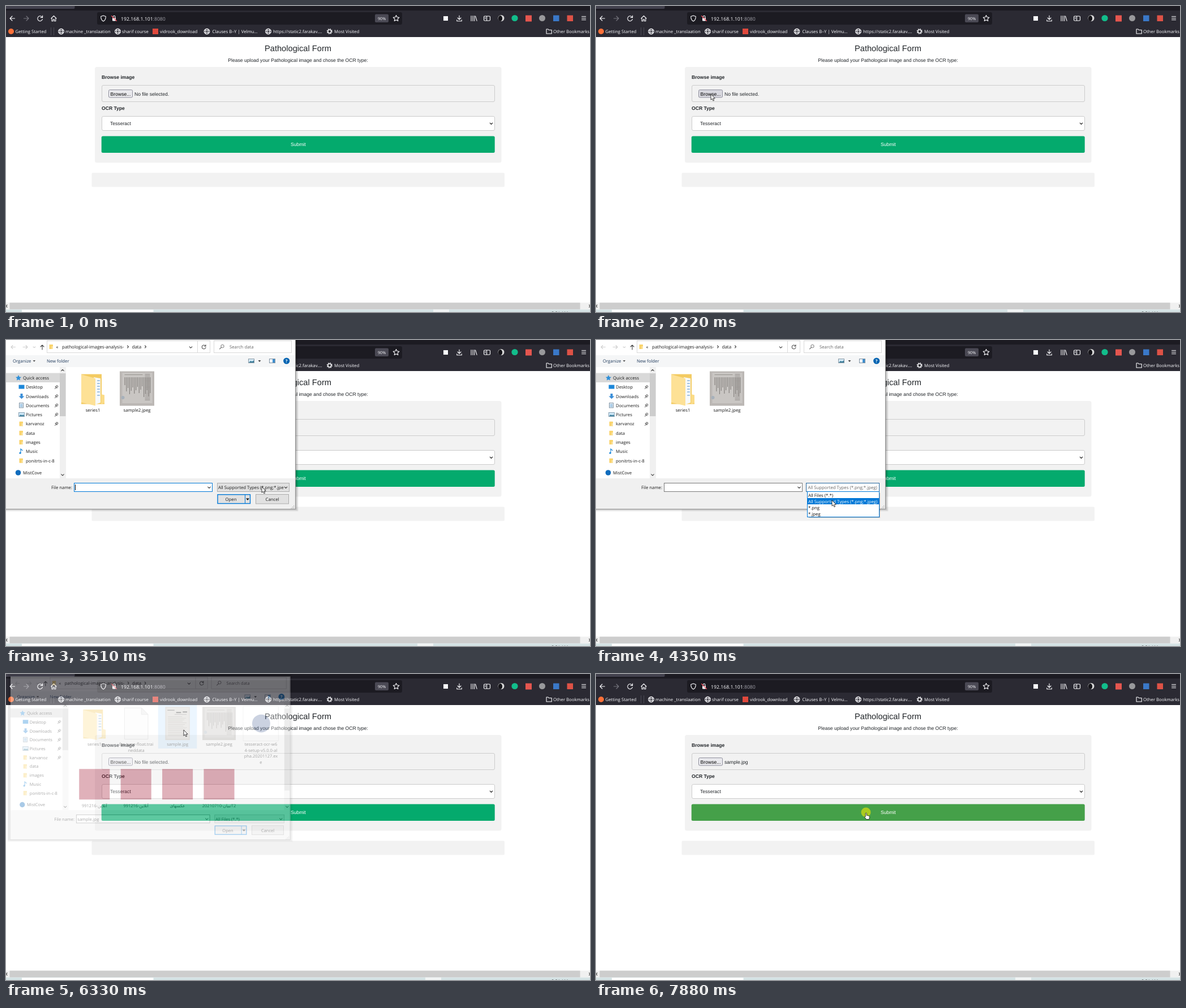
An HTML page that plays this animation: 1032x542 px, repeating every 8 s.

```html
<!DOCTYPE html>
<html lang="en">
<head>
<meta charset="utf-8">
<title>Pathological Form</title>
<style>
  html, body { margin: 0; width: 100%; height: 100%; overflow: hidden; background: #fff; }
  svg { display: block; }
  text { text-rendering: geometricPrecision; white-space: pre; }
  .page { font: 8.6px "Liberation Sans", Arial, sans-serif; fill: #212529; }
  .ui { font: 7.75px "Open Sans", "Noto Sans", "DejaVu Sans", sans-serif; }
  .mid { text-anchor: middle; }
  .line { fill: none; stroke-width: 1.1; stroke-linejoin: round; stroke-linecap: round; }
</style>
</head>
<body>
<svg id="stage" width="1032" height="542" viewBox="0 0 1032 542"></svg>
<script>
const LOOP = 8000;
const stage = document.getElementById('stage');

const rect = (x, y, w, h, fill, more = '') =>
  `<rect x="${x}" y="${y}" width="${w}" height="${h}" fill="${fill}" ${more}/>`;
const box = (x, y, w, h, fill, stroke, more = '') =>
  rect(x + .5, y + .5, w - 1, h - 1, fill, `stroke="${stroke}" ${more}`);
const disc = (x, y, r, fill, more = '') => `<circle cx="${x}" cy="${y}" r="${r}" fill="${fill}" ${more}/>`;
const shape = (d, fill, more = '') => `<path d="${d}" fill="${fill}" ${more}/>`;
const line = (d, stroke = '#fbfbfe', more = '') => `<path class="line" d="${d}" stroke="${stroke}" ${more}/>`;
const text = (x, y, s, more = '') => `<text x="${x}" y="${y}" ${more}>${s}</text>`;
const mid = (x, y, s, more = '') => text(x, y, s, `class="mid" ${more}`);
const group = (id, body, more = '') => `<g id="${id}" ${more}>${body}</g>`;
const chevron = (x, y, up, color = '#444') =>
  line(`M${x - 2.3} ${y + (up ? 1.2 : -1.2)}l2.3 ${up ? -2.4 : 2.4}l2.3 ${up ? 2.4 : -2.4}`, color);
const times = (n, f) => Array.from({ length: n }, (_, i) => f(i)).join('');

function globe(x) {
  return `<g class="line" stroke="#fbfbfe"><circle cx="${x}" cy="45" r="4.8"/>
    <ellipse cx="${x}" cy="45" rx="2.2" ry="4.8"/><path d="M${x - 4.6} 43.3h9.2M${x - 4.6} 46.7h9.2"/></g>`;
}

function star(x, y, r) {
  const points = times(10, i => {
    const a = i * Math.PI / 5 - Math.PI / 2, q = i % 2 ? r * .48 : r;
    return `${x + q * Math.cos(a)},${y + q * Math.sin(a)} `;
  });
  return `<polygon class="line" stroke="#fbfbfe" points="${points}"/>`;
}

function toolbar() {
  return rect(0, 0, 1032, 8, '#1c1b22') + rect(-5, -5, 126.5, 10, '#42414d', 'rx="2"') +
    rect(0, 8, 1032, 47, '#2b2a33') + rect(161, 11, 539, 22, '#1c1b22', 'rx="3"') +
    line('M15.5 22H7m4-4l-4 4 4 4') + line('M31.5 22H40m-4-4l4 4-4 4', '#77767f') +
    line('M64 20a4.4 4.4 0 1 0 .4 3.4M64.6 17v3.4h-3.5') +
    line('M79.8 22l4.6-4.6 4.6 4.6M81 21.3v5.5h2.3v-3h2.2v3h2.3v-5.5') +
    line('M172 17l4.3 1.5c0 4-1 7-4.3 8.5c-3.3-1.5-4.3-4.5-4.3-8.5z') +
    rect(188, 21, 6, 5.5, '#fbfbfe', 'rx="1"') + line('M189.3 21v-2a1.8 1.8 0 0 1 3.6 0v2') +
    line('M186.5 17.5l9 9', '#ff4f5e') +
    text(203, 25.5, '192.168.1.101<tspan fill="#a09fa8">:8080</tspan>', 'style="font-size:8.7px"') +
    rect(652, 14.5, 24, 14.5, '#4a4954', 'rx="2"') + mid(664, 24.7, '90%', 'style="font-size:7.2px"') +
    star(689.5, 22, 5.6) + rect(773, 18, 8, 8, '#fbfbfe') +
    line('M801 17v7m-3-3l3 3 3-3M796.8 24.5v2.3h8.4v-2.3') +
    line('M822 17.5v9M825 17.5v9M827.8 17.5v9M829.5 18l2.6 8.3') +
    line('M846 18h8q1.5 0 1.5 1.5v5q0 1.5-1.5 1.5h-8q-1.5 0-1.5-1.5v-5q0-1.5 1.5-1.5zM849.5 18v8M846.5 20.5h1M846.5 22.5h1') +
    disc(875, 21.5, 5.5, '#d8d8d8') + '<ellipse cx="873.5" cy="22" rx="3.6" ry="5" fill="#151419"/>' +
    disc(899, 21.5, 5.6, '#12bd8b') + rect(918, 16.5, 11, 11, '#e5564f') +
    disc(947.5, 21.5, 5.5, '#99999c') + rect(967, 16.5, 10.5, 10.5, '#3a78c8') +
    rect(991.5, 16.5, 10.5, 10.5, '#dd5246') + line('M1017.5 18.5h7M1017.5 21.5h7M1017.5 24.5h7') +
    disc(9, 45, 5, '#ff7139') + text(16.5, 48, 'Getting Started') +
    rect(79, 38, 1, 14, '#4b4a54') + rect(84, 38, 1, 14, '#4b4a54') +
    globe(97.5) + text(105, 48, 'machine _translaation') + globe(197.5) + text(205, 48, 'sharif course') +
    rect(259, 40, 10, 10, '#e0483c') + text(272, 48, 'vidrook_download') +
    globe(355) + text(364.5, 48, 'Clauses B–Y | Velmu...') + globe(463.5) + text(472, 48, 'https://static2.farakav....') +
    disc(571.8, 45, 2.9, 'none', 'stroke="#fbfbfe" stroke-width="1.4"') +
    disc(571.8, 45, 4.3, 'none', 'stroke="#fbfbfe" stroke-width="1.4" stroke-dasharray="1.7 1.677"') +
    text(580, 48, 'Most Visited') +
    line('M955 41h3l1.2 1.5h5v6.5h-9.2z') + text(967, 48, 'Other Bookmarks');
}

function form() {
  return mid(516, 80, 'Pathological Form', 'style="font-size:14.65px"') +
    mid(516, 98.7, 'Please upload your Pathological image and chose the OCR type:') +
    rect(157, 108, 718.5, 169.5, '#f2f2f2', 'rx="3.5"') + rect(151.5, 295.5, 729.5, 25, '#f2f2f2', 'rx="2"') +
    text(169, 129, 'Browse image', 'font-weight="bold"') + text(169, 184, 'OCR Type', 'font-weight="bold"') +
    box(169, 140, 695, 30, 'none', '#ccc', 'rx="2.5"') +
    box(181, 148, 43, 14.5, '#e9e9ed', '#8f8f9d', 'rx="2" id="browse"') + mid(202.5, 158.8, 'Browse...', 'fill="#000"') +
    text(227, 158.8, '', 'id="chosen"') +
    box(169, 195, 695, 26, '#fff', '#ccc', 'rx="2.5"') + text(184, 211, 'Tesseract') + chevron(857.5, 208.3, false, '#222') +
    rect(168.7, 230.5, 695, 29.5, '#04aa6d', 'rx="2.5" id="submit"') + mid(516.3, 248.4, 'Submit', 'fill="#fff"');
}

function bottomBar() {
  return rect(0, 525.5, 1032, 12, '#f0f0f0') + rect(6.5, 525.5, 1008, 12, '#cdcdcd', 'id="thumb"') +
    line('M2 529.5l-2 2 2 2M1030.5 529.5l2 2-2 2', '#444') + rect(0, 537.5, 1032, 5, '#d5e3e5') +
    rect(28, 538, 232.5, 4, '#fff') + rect(755, 537.5, 28, 5, '#f1f4f4', 'id="task"') +
    text(964, 547.2, '3:31 AM', 'fill="#222"');
}

const folder = (x, y) => rect(x, y - 4, 6.5, 8, '#f9d36c', 'rx=".6"') + rect(x + 4, y - 1, 2.5, 5, '#fbe3a0');

function sidebar() {
  const names = ['Desktop', 'Downloads', 'Documents', 'Pictures', 'karvanoz', 'data', 'images', 'Music', 'ponitrts-in-c-8'];
  const rowY = i => 83.3 + i * 16.3;
  return rect(0, 58.5, 95, 16.5, '#d9d9d9') + rect(95, 48, 11, 197, '#f0f0f0') + rect(95, 59, 10.5, 76, '#cdcdcd') +
    chevron(100, 53.5, true) + chevron(100, 239, false) +
    shape('M22 62l1.5 3.3 3.5.4-2.6 2.4.7 3.5-3.1-1.7-3.1 1.7.7-3.5-2.6-2.4 3.5-.4z', '#2f8fd8') +
    text(30, 70, 'Quick access') +
    names.map((name, i) => text(35, rowY(i) + 2.9, name) +
      (i < 5 ? line(`M86.5 ${rowY(i) + 3}l2-2.5m-1.5-1.5l3 3m-2-3l2-2 2 2-2 2z`, '#777') : '')).join('') +
    rect(22.5, 79.5, 10, 7, '#1c87d9') +
    shape('M25.5 95h4v4.5h3l-5 4.8-5-4.8h3z', '#3a8ed8') +
    box(23, 111, 8, 9.5, '#fff', '#7d93a5') + line('M25 114h4M25 116h4M25 118h4', '#5b9bd0') +
    box(22, 128, 11, 8, '#cfe8f7', '#8aa2b3') + shape('M23 135l3-3 2.5 1.5 2-1.5 2 3z', '#3d7f9c') +
    [4, 5, 6, 8].map(i => folder(23.5, rowY(i))).join('') +
    line('M26 200v-7.5q1 2.5 3.5 3', '#1c87d9') + disc(25, 200.2, 1.6, '#1c87d9') +
    disc(21.5, 235, 4.8, '#0f6cbd') + text(30, 238, 'MistCove');
}

function bigFolder() {
  return shape('M133 60.5h36v36l5 2v15h-41z', '#f3cb62') + shape('M155 66l12 2v43l-12 4z', '#f7f9fb') +
    line('M161.5 72h4M161.5 77h4M161.5 82h4M161.5 87h4M161.5 92h4M161.5 98h4', '#4c8ec9') +
    shape('M133 61l25 7v48.5l-25-6z', '#fde196') + shape('M168 96l6 1.5v14l-6 2z', '#fbdc88') +
    mid(153.5, 127.3, 'series1');
}

// Photographed page whose text hangs in ragged columns; x is its centre.
function raggedSheet(x) {
  return rect(x - 30.5, 55.5, 61, 61, '#bbb7b4') + rect(x - 26, 58, 53, 54, '#c9c6c3') +
    times(17, i => rect(x - 22 + i * 2.8, 66, 1.1, 14 + (i * 11 % 17) + (i > 11 ? 8 : 0), '#817d7a')) +
    times(22, i => rect(x + 14, 60 + i * 2.2, 9, .8, '#918d8a')) +
    rect(x - 22, 61, 32, 1, '#98948f') + disc(x - 25, 102, 3, '#a7b1bb') +
    mid(x, 127.3, 'sample2.jpeg');
}

function allFiles() {
  const archives = ['991216-آنلاین', '991216-آنلاین', 'عکسهای', '20210710-تبیانT2'];
  return rect(0, 0, 71, 80, '#e5f3ff', 'id="hover"') +
    shape('M208.5 57.5h31l12 12v45.5h-43z', '#fafafa', 'stroke="#cfcfcf"') +
    shape('M239.5 57.5v12h12z', '#e6e6e6', 'stroke="#cfcfcf"') +
    mid(230, 127.3, 'fas-tune-float.trai') + mid(230, 138, 'neddata') +
    rect(283, 55.5, 45, 61, '#bdbab5') + rect(285, 57, 41, 57, '#cfccc6') +
    times(13, i => rect(288, 73 + i * 2.9, 26 + i * 7 % 10, .8, '#96928c')) +
    rect(287, 61, 13, 1.5, '#555') + rect(303, 65, 9, 2, '#222') + rect(315, 64, 8, 2, '#222') + rect(300, 69, 22, 1, '#777') +
    mid(305.5, 127.3, 'sample.jpg') + raggedSheet(381.5) +
    box(425, 54, 65.5, 64.5, '#fff', '#e2e2e2') + disc(458.5, 86, 16.5, '#6d82ab') +
    ['tesseract-ocr-w6', '4-setup-v5.0.0-al', 'pha.20201127.ex', 'e'].map((s, i) => mid(458, 127.3 + i * 10.8, s)).join('') +
    archives.map((s, i) => rect(125.5 + i * 76, 169.5, 56, 56, '#a8243f') +
      mid(153.5 + i * 76, 240, s, 'direction="ltr"')).join('') +
    rect(500.5, 48, 11, 197, '#f0f0f0') + rect(501, 59, 10, 150, '#cdcdcd') + chevron(506, 53.5, true) + chevron(506, 239, false);
}

function typeList() {
  const rows = ['All Files (*.*)', 'All Supported Types (*.png;*.jpeg)', '*.png', '*.jpeg'];
  return box(371, 253, 130, 16, '#fff', '#26689f') + text(374.5, 264, rows[1], 'fill="#666"') +
    rect(376, 271, 126, 44, '#000', 'opacity=".25"') + box(373, 268, 128, 46, '#fff', '#0078d7') +
    rect(374, 280, 126, 11, '#0078d7', 'id="mark"') +
    rows.map((s, i) => text(375, 277.6 + i * 11, s, 'class="row"')).join('');
}

function dialog() {
  return times(5, i => rect(-5, -5, 517.5 + i, 304.5 + i, '#000', 'opacity=".06"')) +
    rect(0, 0, 512, 299.5, '#fff') + rect(0, 27, 512, 21, '#f5f6f7') +
    line('M16.5 12.5H9m3-3l-3 3 3 3M30 12.5h8m-3-3l3 3-3 3M48 12l2 1.5 2-1.5', '#d0d0d0') +
    line('M64 17V9m-3 3l3-3 3 3', '#444') +
    box(72, 1, 289, 22, '#fff', '#d9d9d9') + rect(338, 1, 1, 21, '#d9d9d9') + folder(76.5, 12) +
    text(88.5, 15, '«') + text(99, 15, 'pathological-images-analysis-', 'style="font-size:8px"') +
    line('M214.5 10l2 2-2 2M245.5 10l2 2-2 2', '#444') + text(222.5, 15, 'data', 'style="font-size:8px"') + chevron(326.5, 13, false) +
    line('M352.5 10.5a3.4 3.4 0 1 0 .5 2.5M353 8.5v2.5h-2.5', '#555') +
    box(367, 1, 138, 22, '#fff', '#d9d9d9') + disc(382.5, 11, 2.7, 'none', 'stroke="#777"') + line('M380.5 13l-3 3', '#777') +
    text(395, 15, 'Search data', 'fill="#666"') +
    text(12, 40, 'Organize', 'fill="#1e395b"') + shape('M47.5 36h4.6l-2.3 2.6z', '#444') + text(72, 40, 'New folder', 'fill="#1e395b"') +
    box(428, 33, 11, 8, '#d7ebf8', '#8a9aa6') + shape('M429 40l3-3 3 1 3-2v4z', '#3d7f9c') + shape('M445.5 36h5l-2.5 2.8z', '#333') +
    box(465, 33, 11, 8, '#fff', '#7c8fa0') + rect(471, 34, 4, 6, '#3f8fd0') +
    disc(495.7, 37, 5.6, '#0063b1') + mid(495.7, 40, '?', 'fill="#fff" font-weight="bold"') +
    sidebar() + bigFolder() + group('few', raggedSheet(231.5)) + group('all', allFiles()) +
    rect(0, 245, 512, 54.5, '#f0f0f0') + text(117, 264, 'File name:', 'text-anchor="end"') +
    box(120, 253, 245, 16, '#fff', '#0078d7', 'id="nameBox"') + chevron(359, 261.3, false) +
    rect(122, 256, 1, 10, '#000', 'id="caret"') + text(122.5, 264, 'sample.jpg', 'id="fileName"') +
    box(373, 253, 128, 16, '#e1e1e1', '#adadad') + text(375, 264, '', 'id="kind"') + chevron(494.5, 261.3, false) +
    rect(374, 273.8, 57.5, 15.8, '#e1e1e1', 'stroke="#0078d7" stroke-width="1.4"') + rect(422, 274, 1, 16, '#0078d7') +
    mid(397.5, 284.8, 'Open') + shape('M424 280.5h6l-3 3.4z', '#111') +
    box(441, 273, 59, 17.5, '#e1e1e1', '#adadad') + mid(470.5, 284.8, 'Cancel') +
    times(3, i => times(i + 1, j => rect(508 - j * 2.2, 293 + i * 2.2, 1.2, 1.2, '#aaa'))) +
    line('M0 299.5H511.5V0', '#949494') + group('types', typeList());
}

stage.innerHTML = group('page', form(), 'class="page"') +
  group('chrome', toolbar(), 'class="ui" fill="#fbfbfe"') + group('bottom', bottomBar(), 'class="ui"') +
  group('dialog', dialog(), 'class="ui" fill="#1a1a1a"') +
  group('cursor', disc(0, -.5, 8.5, '#ffee00', 'opacity=".55" id="click"') +
    shape('M0 0V10.3L2.3 8.2 3.9 11.9 5.6 11.2 4.1 7.6H7.2Z', '#fff', 'id="arrow" stroke="#111" stroke-width=".8"') +
    shape('M-.8 1.2Q.3-.3 1.3 1.2V5.2Q2.3 4.4 3.2 5.4 4.2 4.7 5 5.9 6.3 5.6 6.4 7V9.5L5.3 12H.7L-2.6 7.6Q-2.2 6.2-.8 7.4Z',
      '#fff', 'id="hand" stroke="#111" stroke-width=".8"'));

const el = id => document.getElementById(id);
const show = (id, on) => el(id).setAttribute('display', on ? 'inline' : 'none');
const set = (id, name, value) => el(id).setAttribute(name, value);
const within = (v, a, b) => v >= a && v < b;

// Spells of screen updates: first, last, count.
const bursts = [[180, 940, 12], [1010, 1550, 9], [2010, 2810, 13], [2880, 3650, 12], [3720, 4490, 12], [4560, 4560, 1],
  [4760, 5500, 11], [5570, 5850, 5], [6250, 6990, 11], [7060, 7480, 7], [7880, 7880, 1]];

// Pointer stops: time, x, y.
const route = [[180, 610, 528], [300, 590, 500], [900, 425, 242], [1010, 390, 234], [1550, 203, 156], [2276, 203, 156],
  [2470, 238, 170], [2810, 246, 150], [2880, 248, 138], [3510, 452, 260], [3720, 452, 261], [4340, 417, 284], [4490, 416, 270],
  [4560, 416, 269], [4900, 416, 269], [5270, 318, 175], [5500, 352, 120], [5640, 318, 102], [5850, 314, 99],
  [6398, 314, 99], [6990, 383, 234], [7480, 477, 245.5]];

function lastUpdate(t) {
  let at = 0;
  for (const [a, b, n] of bursts) {
    const gap = n > 1 ? (b - a) / (n - 1) : 1;
    if (t >= a) at = Math.min(b, a + Math.floor((t - a) / gap + 1e-6) * gap);
  }
  return at;
}

function pointer(t) {
  const i = route.findIndex(p => p[0] > t);
  if (i < 1) return route[i < 0 ? route.length - 1 : 0].slice(1);
  const [a, x, y] = route[i - 1], [b, x2, y2] = route[i];
  const k = (t - a) / (b - a), e = k * k * (3 - 2 * k);
  return [x + (x2 - x) * e, y + (y2 - y) * e];
}

function draw(now) {
  const t = now % LOOP, s = lastUpdate(t), [x, y] = pointer(s);
  const open = Math.min(1, Math.max(0, s < 4000 ? (s - 2210) / 133 : (6398 - s) / 148));
  const away = 1 - open, overPage = open < .6 && s >= 180;
  const onSubmit = overPage && within(x, 169, 864) && within(y, 231, 260);

  set('submit', 'fill', onSubmit ? '#45a049' : '#04aa6d');
  set('browse', 'fill', overPage && within(x, 181, 224) && within(y, 148, 163) ? '#d8d8df' : '#e9e9ed');
  set('thumb', 'fill', overPage && y > 525 ? '#a6a6a6' : '#cdcdcd');
  set('task', 'x', s < 2140 ? 755 : s < 3780 ? 727 : 741);
  el('chosen').textContent = s < 6390 ? 'No file selected.' : 'sample.jpg';

  show('dialog', open > .01);
  set('dialog', 'opacity', open ** 1.5);
  set('dialog', 'transform', `translate(${16 * away} ${9 * away}) scale(${1 - .068 * away})`);

  const everything = s >= 4830, picked = s >= 5700;
  show('few', !everything);
  show('all', everything);
  show('types', within(s, 3570, 4830));
  show('caret', s < 3570 && (s - 2343) % 1060 < 530);
  show('fileName', picked);
  set('nameBox', 'stroke', s < 3720 ? '#0078d7' : '#7a7a7a');
  el('kind').textContent = everything ? 'All Files (*.*)' : 'All Supported Types (*.png;*.jpe';

  const marked = within(s, 3790, 4830) && within(y, 268, 280) ? 0 : 1;
  set('mark', 'y', 269 + marked * 11);
  document.querySelectorAll('.row').forEach((row, i) => row.setAttribute('fill', i === marked ? '#fff' : '#111'));

  const column = Math.floor((x - 118) / 76), lower = y > 166;
  show('hover', within(column, 0, 5) && y < 245 && (!lower || column < 4));
  set('hover', 'transform', `translate(${118 + column * 76} ${lower ? 166 : 52})`);
  set('hover', 'fill', picked ? '#cce8ff' : '#e5f3ff');

  show('cursor', s >= 180);
  set('cursor', 'transform', `translate(${x} ${y})`);
  show('arrow', !onSubmit);
  show('hand', onSubmit);
  show('click', within(s, 2010, 2140) || within(s, 4760, 4830) || s >= 7880);
}

function frame(now) {
  draw(now);
  requestAnimationFrame(frame);
}
draw(0);
requestAnimationFrame(frame);
</script>
</body>
</html>
```
